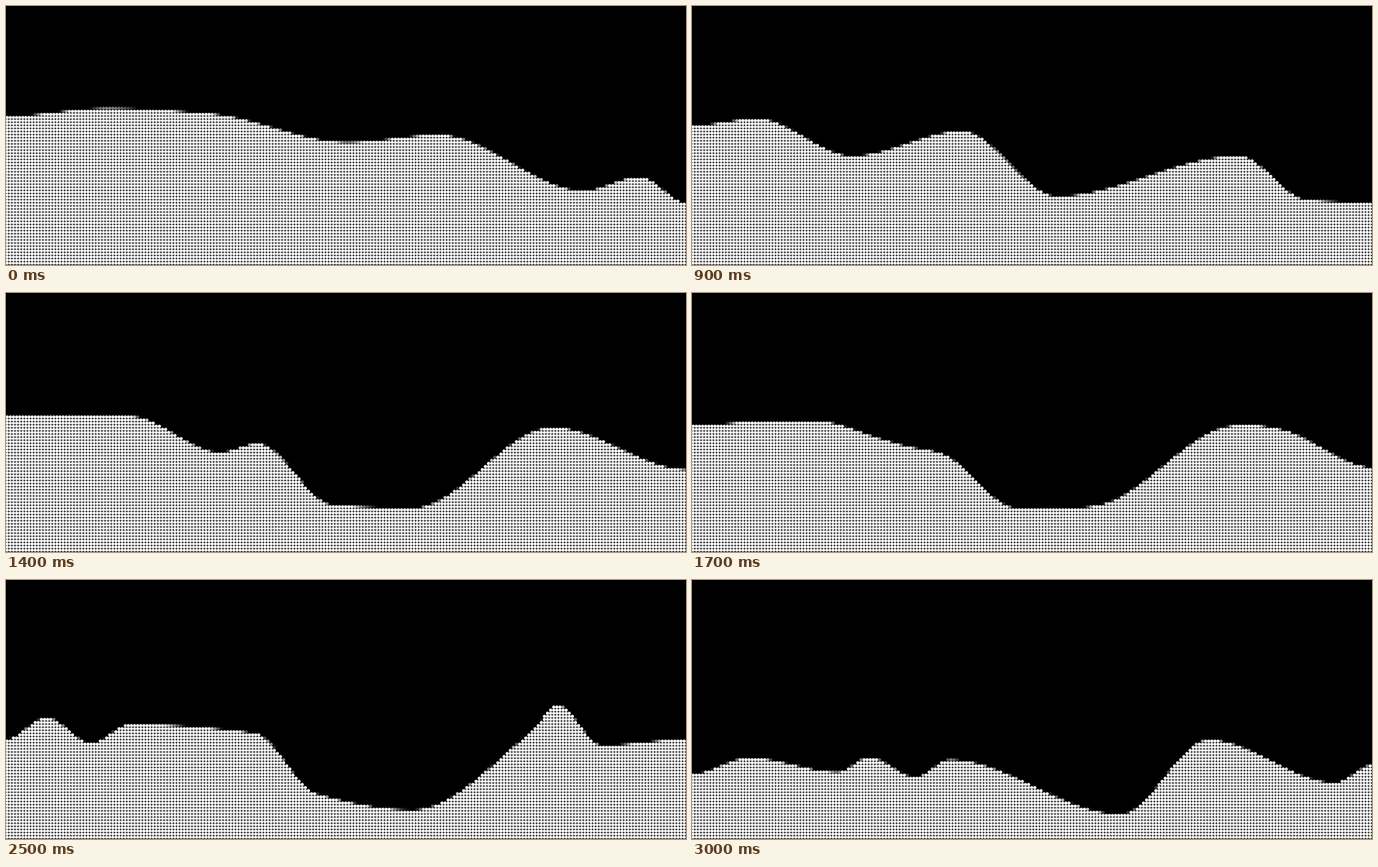
An HTML page with a canvas for the animation above (3.1 s loop, 1095 by 418 pixels).

```html
<!DOCTYPE html>
<html lang="en">
<head>
<meta charset="utf-8">
<title>Dot ridge</title>
<style>
  html, body { margin: 0; width: 100%; height: 100%; overflow: hidden; background: #000; }
  canvas { display: block; }
</style>
</head>
<body>
<canvas id="stage" width="1095" height="418"></canvas>
<script>
const LOOP = 3100, STEP = 100, PITCH = 5, COLS = 220, ROWS = 84, LEFT = 2;
const ctx = document.getElementById('stage').getContext('2d');
const clamp = v => Math.max(0, Math.min(1, v));
const mix = (a, b, u) => a + (b - a) * u;

// Smooth curve through [x, y] points, level at every crest and dip.
function curve(points) {
  const last = points.length - 1;
  const slope = i => (points[i + 1][1] - points[i][1]) / (points[i + 1][0] - points[i][0]);
  const tangent = i => {
    if (i === 0 || i === last) return 0;
    const a = slope(i - 1), b = slope(i);
    return a * b <= 0 ? 0 : 2 * a * b / (a + b);
  };
  return x => {
    let i = 0;
    while (i < last - 1 && x > points[i + 1][0]) i++;
    const [x0, y0] = points[i], [x1, y1] = points[i + 1];
    const w = x1 - x0, u = (x - x0) / w, v = 1 - u;
    return v * v * ((1 + 2 * u) * y0 + u * w * tangent(i))
         + u * u * ((1 + 2 * v) * y1 - v * w * tangent(i + 1));
  };
}

// The main crests and dips of the ridge at a given time.
const keys = [];
function ridge(time, ...points) {
  keys.push({ time, height: curve(points) });
}

ridge(0, [0, 178], [163, 165], [330, 174], [550, 220], [697, 208], [930, 298], [1020, 276], [1097, 318]);
ridge(400, [0, 177], [130, 196], [206, 168], [290, 213], [430, 197], [588, 268], [722, 232], [925, 292], [1097, 310]);
ridge(900, [0, 193], [105, 182], [258, 242], [435, 202], [588, 307], [880, 242], [990, 313], [1097, 317]);
ridge(1400, [0, 198], [200, 199], [345, 257], [405, 243], [526, 342], [655, 347], [880, 217], [1097, 285]);
ridge(2100, [0, 235], [130, 216], [310, 222], [513, 355], [620, 347], [860, 211], [950, 203], [1097, 277]);
ridge(2500, [0, 257], [65, 222], [137, 263], [200, 233], [400, 247], [500, 345], [655, 371], [845, 246], [888, 202], [960, 267], [1097, 257]);
ridge(3000, [0, 313], [92, 287], [235, 310], [285, 286], [360, 318], [415, 290], [690, 378], [832, 258], [1035, 327], [1097, 298]);

const dot = document.createElement('canvas');
dot.width = dot.height = 6;
const dotCtx = dot.getContext('2d');
dotCtx.fillStyle = '#fff';
dotCtx.arc(3, 3, 2.5, 0, 2 * Math.PI);
dotCtx.fill();

function draw(time) {
  let k = 0;
  while (k < keys.length - 2 && time >= keys[k + 1].time) k++;
  const from = keys[k], to = keys[k + 1];
  const u = (time - from.time) / (to.time - from.time);
  ctx.globalAlpha = 1;
  ctx.fillStyle = '#000';
  ctx.fillRect(0, 0, 1095, 418);
  for (let c = 0; c < COLS; c++) {
    const x = LEFT + c * PITCH;
    const top = mix(from.height(x), to.height(x), u);
    for (let r = Math.floor(top / PITCH); r < ROWS; r++) {
      const y = r * PITCH;
      // Dots fade in over the two pixels around the ridge line.
      ctx.globalAlpha = clamp((y - top) / 2 + 0.5);
      ctx.drawImage(dot, x - 3, y - 3);
    }
  }
}

const start = performance.now();
let shown = -1;
function tick() {
  const step = Math.floor((performance.now() - start) % LOOP / STEP);
  if (step !== shown) draw((shown = step) * STEP);
  requestAnimationFrame(tick);
}
tick();
</script>
</body>
</html>
```
